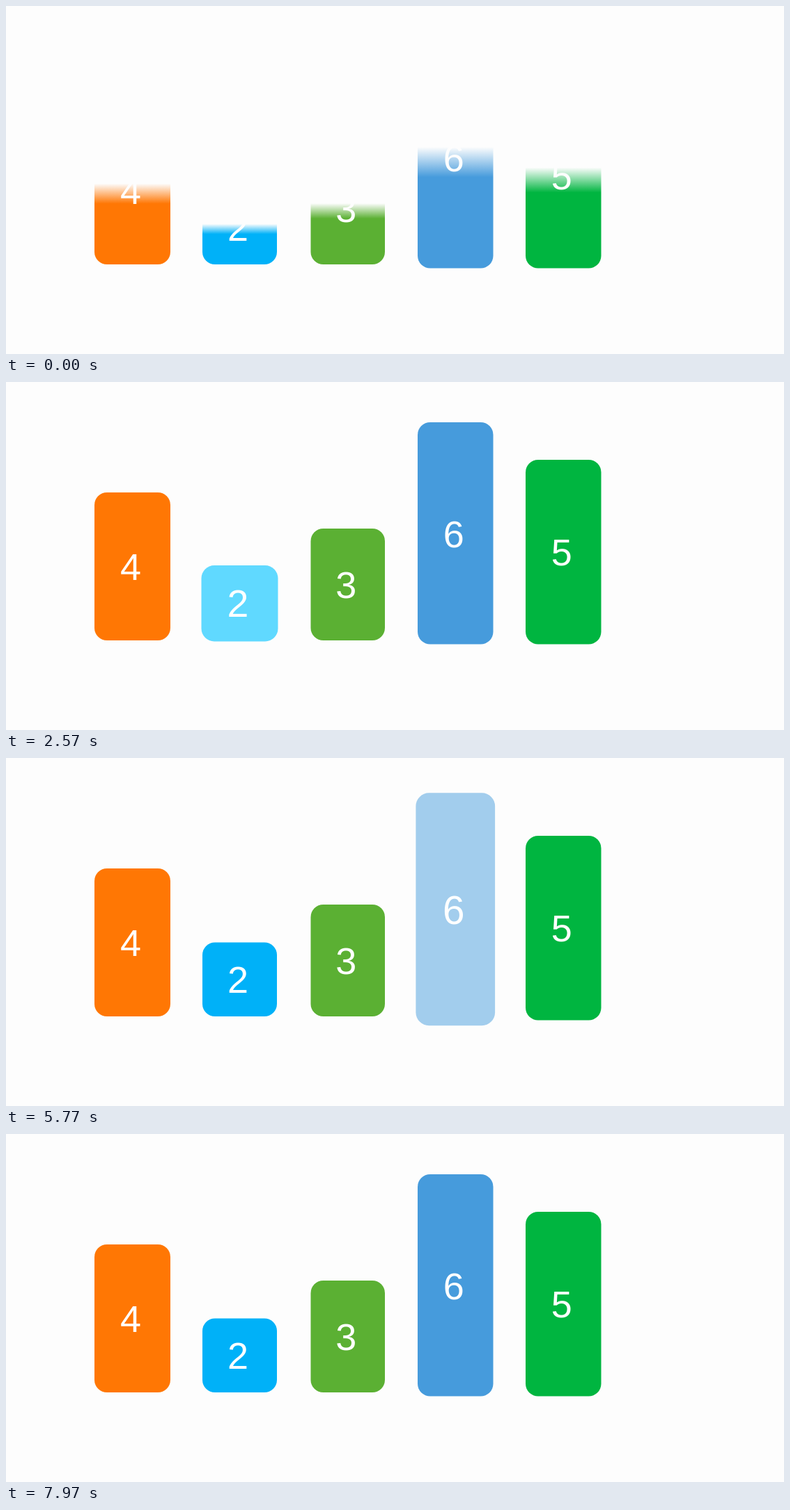
Animation of 1117x501 px, one loop 8000 ms. Source, as an HTML page:

```html
<!DOCTYPE html>
<html lang="en">
<head>
<meta charset="utf-8">
<title>Pulsing bars</title>
<style>
  html, body { margin: 0; width: 100%; height: 100%; overflow: hidden; background: #fdfdfd; }
  svg { display: block; width: 1117px; height: 501px; }
  text { font: 54px "Liberation Sans", Arial, sans-serif; fill: #fff; text-anchor: middle; }
</style>
</head>
<body>
<svg viewBox="0 0 1117 501">
  <linearGradient id="wipe" x1="0" x2="0">
    <stop offset="0" stop-color="#fdfdfd" stop-opacity="0"/>
    <stop offset="1" stop-color="#fdfdfd"/>
  </linearGradient>
</svg>
<script>
const LOOP = 8000, WIPE_END = 660;
const PULSE_START = 740, PULSE_STEP = 1425, PULSE_LENGTH = 1450;

const bars = [
  { n: 4, x: 127, y: 159, w: 109, h: 213, base: 285, color: [255, 119, 4], light: [255, 187, 130] },
  { n: 2, x: 282, y: 265.5, w: 107, h: 106.5, base: 337.5, color: [0, 177, 248], light: [96, 217, 255] },
  { n: 3, x: 437.5, y: 211, w: 106.5, h: 161, base: 311, color: [91, 176, 51], light: [175, 218, 159] },
  { n: 6, x: 591, y: 58, w: 108.5, h: 319.5, base: 238, color: [70, 155, 220], light: [162, 205, 237] },
  { n: 5, x: 746, y: 112, w: 108.5, h: 265.5, base: 263.5, color: [0, 181, 64], light: [0, 209, 134] }
];

const svg = document.querySelector("svg");
const wipe = document.getElementById("wipe");

function add(parent, tag, attrs) {
  const el = document.createElementNS("http://www.w3.org/2000/svg", tag);
  for (const key in attrs) el.setAttribute(key, attrs[key]);
  return parent.appendChild(el);
}

for (const b of bars) {
  b.group = add(svg, "g", {});
  b.rect = add(b.group, "rect", { x: b.x, y: b.y, width: b.w, height: b.h, rx: 18 });
  add(b.group, "text", { x: b.x + b.w / 2 - 2.5, y: b.base }).textContent = b.n;
  b.cover = add(svg, "rect", { x: b.x - 1, y: b.y - 1, width: b.w + 2, height: b.h + 2, fill: "url(#wipe)" });
}

function draw(t) {
  // Soft edge rising through each bar, as a fraction of its height
  const edge = 1 - (0.41 + 0.59 * t / WIPE_END);
  wipe.setAttribute("y1", edge);
  wipe.setAttribute("y2", edge - 0.135);

  bars.forEach((b, i) => {
    b.cover.style.display = t < WIPE_END ? "" : "none";
    const p = (t - PULSE_START - i * PULSE_STEP) / PULSE_LENGTH;
    const near = Math.max(0, Math.min(p, 1 - p));
    const scale = 1 + 0.1 * near;
    const fade = Math.min(1, near / 0.165);
    const cx = b.x + b.w / 2, cy = b.y + b.h / 2;
    b.group.setAttribute("transform", `translate(${cx} ${cy}) scale(${scale}) translate(${-cx} ${-cy})`);
    b.rect.setAttribute("fill", `rgb(${b.color.map((c, k) => Math.round(c + (b.light[k] - c) * fade))})`);
  });
}

const start = performance.now();
function tick() {
  draw((performance.now() - start) % LOOP);
  requestAnimationFrame(tick);
}
tick();
</script>
</body>
</html>
```
